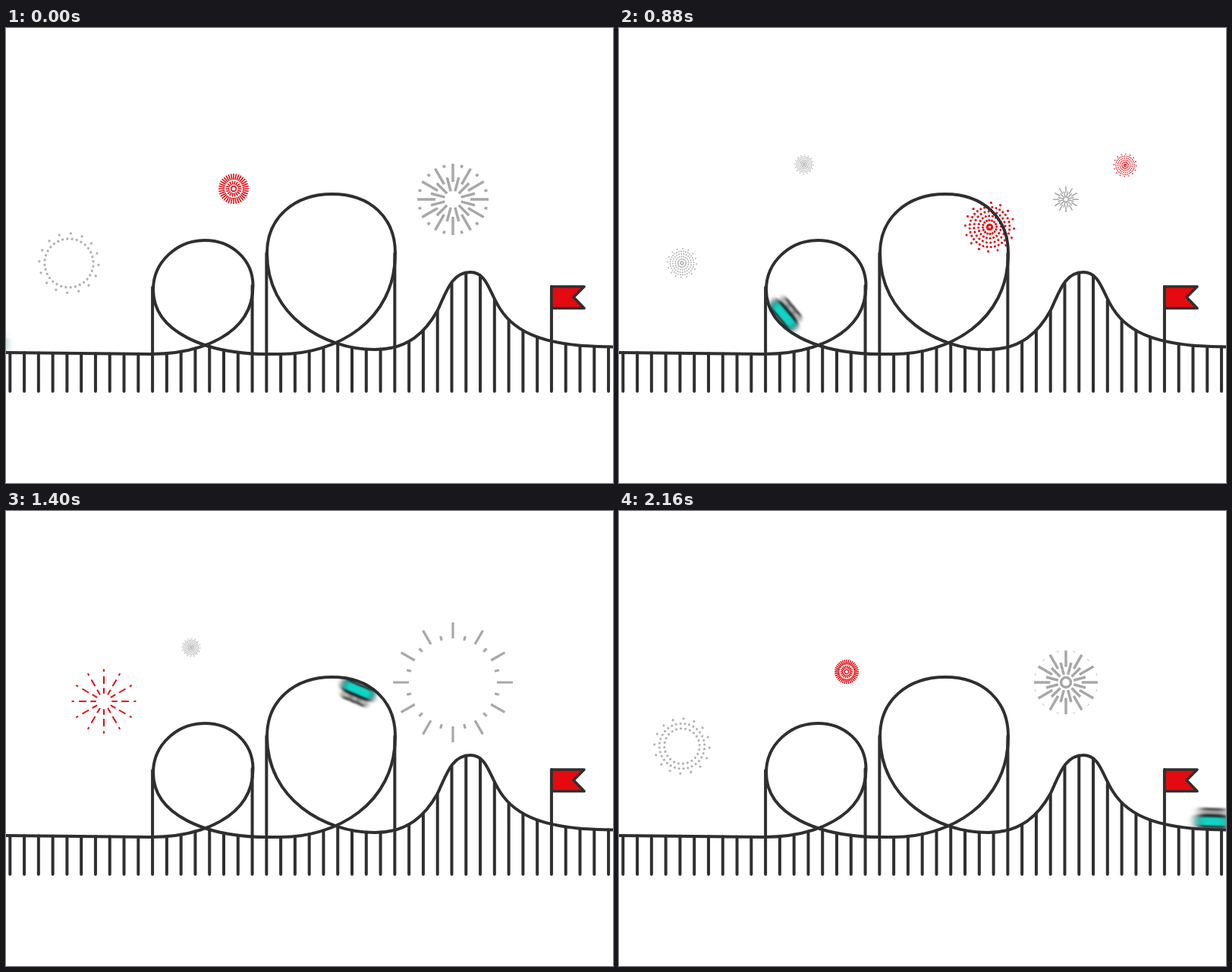
An HTML page for the animation above (2200 ms loop, 800 by 600 pixels).

```html
<!DOCTYPE html>
<html lang="en">
<head>
<meta charset="utf-8">
<title>Roller coaster</title>
<style>
  html, body { margin: 0; width: 100%; height: 100%; overflow: hidden; background: #fff; }
  svg { display: block; width: 100vw; height: 100vh; }
</style>
</head>
<body>
<svg viewBox="0 0 800 600">
  <defs>
    <filter id="speed" filterUnits="userSpaceOnUse" x="-60" y="-55" width="120" height="80" color-interpolation-filters="sRGB">
      <feGaussianBlur id="blur" stdDeviation="1.3"/>
    </filter>
  </defs>
  <g id="sky" fill="none"></g>
  <g fill="none" stroke="#2f2f30" stroke-width="4" stroke-linecap="round">
    <path id="posts"/>
    <path id="track" d="M-80 427.2L0 428L190 430C255 430 325.5 405 325.5 340
      C325.5 305 297 280 262 280C226 280 194 308 194 345C194 400 262 430 345 430
      L362 430C435 430 513 387 513 297C513 250 480 219 430 219C380 219 344 250 344 297
      C344 380 420 424 486 424C530 424 553 401 569 372C580 349 587 322 612 322
      C634 322 637 349 651 370C671 402 710 420 800 420.5L880 420.5"/>
    <path d="M719 341H762L748 355L762 369.5H719Z" fill="#e50a0f" stroke-width="3.6" stroke-linejoin="round"/>
  </g>
  <g id="car" filter="url(#speed)" stroke="#1c1c1c" stroke-width="3">
    <rect x="-21.5" y="-18" width="43" height="14.5" rx="5" fill="#10d4c5"/>
    <g fill="#fff">
      <circle cx="-11" cy="-23" r="4.8"/>
      <circle cx="0" cy="-23" r="4.8"/>
      <circle cx="11" cy="-23" r="4.8"/>
    </g>
  </g>
</svg>
<script>
const LOOP = 2200, STEP = 40;
const RED = '#e60a10', GRAY = '#a8a8a8', PALE = '#b2b2b2';
const $ = id => document.getElementById(id);
const clamp = (v, lo = 0, hi = 1) => Math.min(hi, Math.max(lo, v));

// Track geometry
const track = $('track');
const samples = Array.from({ length: Math.floor(track.getTotalLength()) }, (_, s) => track.getPointAtLength(s));

function nearest(x, y) {
  let best = 0, min = Infinity;
  samples.forEach((p, s) => {
    const d = Math.hypot(p.x - x, p.y - y);
    if (d < min) { min = d; best = s; }
  });
  return best;
}

// Posts stand under the lowest rail; these reach the sides of the loops, one carries the flag
const tall = { 10: 342, 17: 340, 18: 297, 27: 297, 38: 341 };
let posts = '';
for (let i = 0; i < 43; i++) {
  const x = 5.3 + 18.78 * i;
  const top = tall[i] || Math.max(...samples.filter(p => Math.abs(p.x - x) < 1).map(p => p.y));
  posts += `M${x} ${top}V479`;
}
$('posts').setAttribute('d', posts);

// Ride: time, point on the track, speed in px/ms
const ride = [
  [0, -28, 428, 1.7], [280, 314, 382, 0.9], [600, 256, 280, 0.2], [1080, 388, 428, 1.1],
  [1400, 468, 227, 0.8], [1680, 400, 398, 1.05], [2160, 782, 420, 1.1], [2200, 826, 420.5, 1.1]
].map(([t, x, y, v]) => ({ t, s: nearest(x, y), v }));

function rideAt(t) {
  const i = ride.findIndex(k => k.t > t);
  const a = ride[i - 1], b = ride[i], h = b.t - a.t, u = (t - a.t) / h;
  const pos = k => {
    const k2 = k * k, k3 = k2 * k;
    return a.s * (2 * k3 - 3 * k2 + 1) + b.s * (3 * k2 - 2 * k3)
      + h * (a.v * (k3 - 2 * k2 + k) + b.v * (k3 - k2));
  };
  return { s: pos(u), v: (pos(u + 0.01) - pos(u - 0.01)) / (0.02 * h) };
}

function moveCar(t) {
  const { s, v } = rideAt(t);
  const p = track.getPointAtLength(s);
  const a = track.getPointAtLength(s - 8), b = track.getPointAtLength(s + 8);
  const angle = Math.atan2(b.y - a.y, b.x - a.x) * 180 / Math.PI;
  $('car').setAttribute('transform', `translate(${p.x} ${p.y}) rotate(${angle})`);
  $('blur').setAttribute('stdDeviation', `${0.7 + 4 * Math.abs(v)} 1.3`);
}

// Fireworks: path helpers around the origin, angles in degrees
function rays(n, from, to, turn = 0) {
  if (to <= from) return '';
  let d = '';
  for (let i = 0; i < n; i++) {
    const a = (turn + i * 360 / n) * Math.PI / 180, c = Math.cos(a), s = Math.sin(a);
    d += `M${(c * from).toFixed(2)} ${(s * from).toFixed(2)}L${(c * to).toFixed(2)} ${(s * to).toFixed(2)}`;
  }
  return d;
}
const dots = (n, r, turn) => rays(n, r, r + 0.02, turn);
const ring = r => `M${r} 0A${r} ${r} 0 1 1 ${-r} 0A${r} ${r} 0 1 1 ${r} 0`;

// Each kind gives path and line width at u ms after the start
const kinds = {
  dotted: { life: 610, cap: 'round', draw(u) {
    const R = 1.7 + 0.072 * u, hollow = 13 + 0.2 * (u - 440);
    let d = '';
    [16, 32, 24, 20, 16, 12].forEach((n, k) => {
      const r = R * (1 - 0.18 * k);
      if (r > hollow || k === 0) d += dots(n, r, 3.4 + k * 4);
    });
    return [d, 2 * (0.3 + 0.035 * R) * clamp((630 - u) / 80)];
  } },
  bars: { life: 670, cap: 'butt', draw(u) {
    const p = u - 340, after = Math.max(0, p), late = Math.max(0, p - 280);
    const R = 47 + p * (p < 0 ? 0.125 : 0.114);
    const tail = Math.min(23 + p * (p < 0 ? 0.06 : 0.125), p < 0 ? R * 0.5 : R) + late * 0.4;
    let d = rays(12, tail, R);
    d += p < 0 ? rays(12, 0.25 * R, 0.64 * R, 15) : rays(12, 11 + 0.25 * p, 30 + 0.114 * p, 15);
    const tip = p < 0 ? R : 47 + 0.057 * p;
    d += rays(12, tip - Math.max(0, 4 + (p < 0 ? 0.085 : 0.007) * p) + late * 0.15, tip, 15);
    if (p < -10) d += ring(Math.min(6.5, R * 0.2));
    return [d, Math.min(3.5, R * 0.09) - after * 0.001];
  } },
  dashed: { life: 530, cap: 'butt', draw(u) {
    const R = 5 + 0.11 * u;
    let d = rays(12, 2.6 + 0.06 * u, Math.min(R, 33));
    if (u > 330) {
      const length = 7 * clamp((u - 315) / 55) * clamp((530 - u) / 100);
      d += rays(12, R - length, R);
    }
    if (u > 120 && u < 365) d += rays(12, 0.03 * u, 0.052 * u);
    if (u < 110) d += ring(3);
    return [d, 2];
  } },
  dense: { life: 520, cap: 'butt', draw(u) {
    const R = u < 200 ? 0.1 * u : 20 + 0.066 * (u - 200);
    const k = clamp((u - 200) / 200);
    let d = rays(36, R * (0.6 + 0.4 * k), R) + rays(18, R - 1.5, R, 10);
    if (k < 0.5) d += rays(18, R * (0.28 + 0.6 * k), R * (0.52 + 0.12 * k));
    if (k < 0.1) d += ring(R * 0.17) + dots(1, 0, 0);
    return [d, Math.min(1.6, R * 0.09)];
  } }
};

// kind, x, y, colour, scale, start
const bursts = [
  ['dotted', 83, 310, PALE, 1, 640],
  ['dotted', 83, 310, PALE, 1, 1680],
  ['dense', 300, 212, RED, 1, 2000],
  ['bars', 589, 226, GRAY, 1, 780],
  ['bars', 589, 226, GRAY, 1, 1860],
  ['dashed', 129, 251, RED, 1, 220],
  ['dashed', 129, 251, RED, 1, 1060],
  ['dotted', 488.5, 262.5, RED, 1.3, 560],
  ['dotted', 244, 180, PALE, 1.1, 750],
  ['dotted', 244, 180, PALE, 1.1, 1275],
  ['dotted', 667, 181, RED, 0.9, 675]
].map(([kind, x, y, color, scale, start]) => {
  const el = document.createElementNS('http://www.w3.org/2000/svg', 'path');
  el.setAttribute('transform', `translate(${x} ${y}) scale(${scale})`);
  el.setAttribute('stroke', color);
  el.setAttribute('stroke-linecap', kinds[kind].cap);
  $('sky').append(el);
  return { el, start, ...kinds[kind] };
});

function render(t) {
  moveCar(t);
  for (const { el, start, life, draw } of bursts) {
    const u = (t - start + LOOP) % LOOP;
    const [d, width] = u > 0 && u < life ? draw(u) : ['', 0];
    el.setAttribute('d', d);
    el.setAttribute('stroke-width', width);
  }
}

const begin = performance.now();
function tick() {
  const t = Math.max(0, performance.now() - begin) % LOOP;
  render(Math.floor(t / STEP) * STEP);
  requestAnimationFrame(tick);
}
tick();
</script>
</body>
</html>
```
